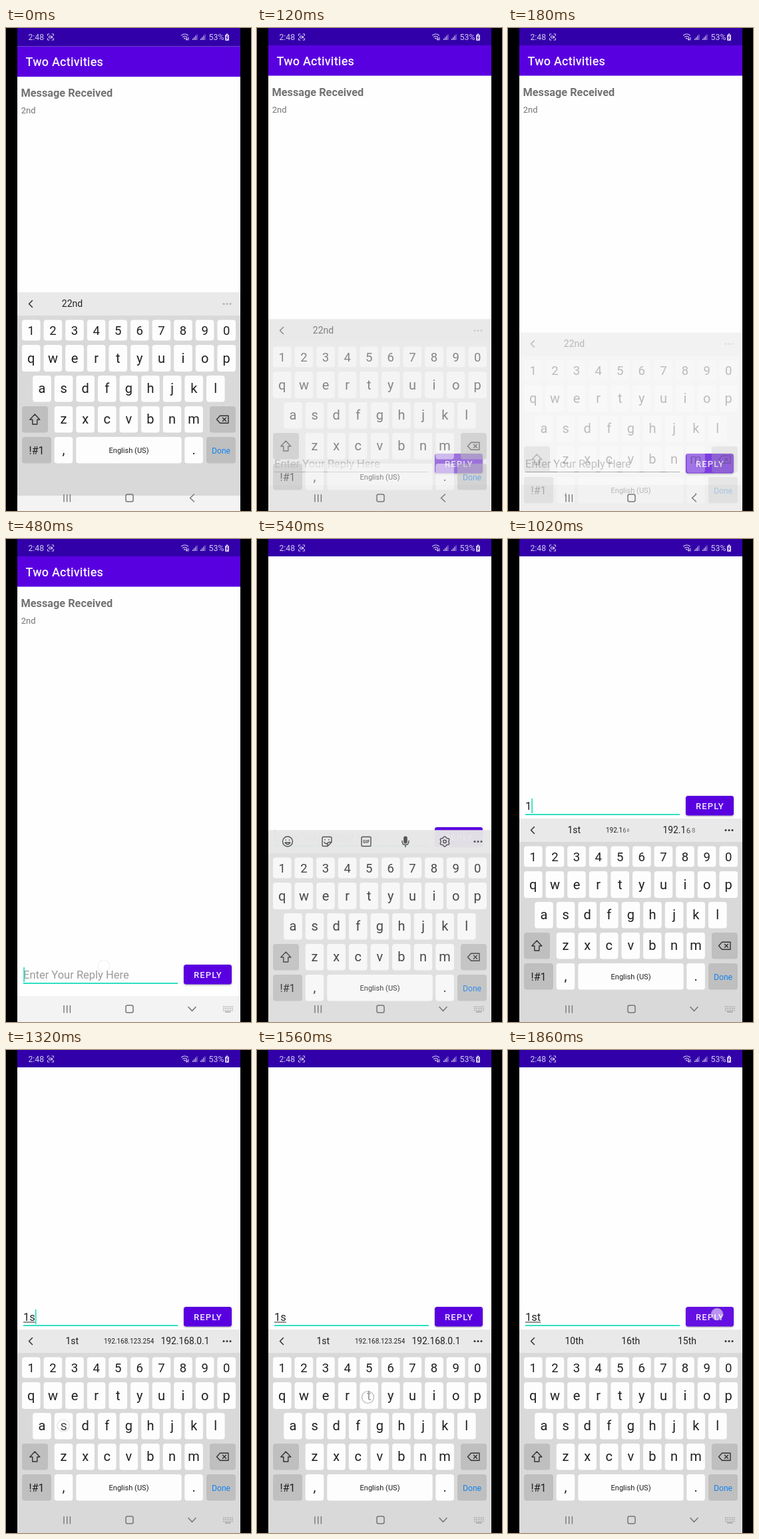
These frames come from a looping animation (368x724 px, 1.92 s). An HTML page with a canvas:

```html
<!DOCTYPE html>
<html lang="en">
<head>
<meta charset="utf-8">
<title>Two Activities</title>
<style>
html, body { margin: 0; width: 100%; height: 100%; overflow: hidden; background: #000; }
canvas { display: block; }
</style>
</head>
<body>
<canvas id="stage" width="368" height="724"></canvas>
<script>
const c = document.getElementById('stage').getContext('2d');
const LOOP = 1920, STEP = 60;
const LEFT = 17, WIDTH = 335;
const PURPLE = '#5900e0', DARK = '#3200a9', TEAL = '#2fe0c2', INK = '#202020';

const clamp = v => Math.max(0, Math.min(1, v));
const during = (t, a, b) => t >= a && t < b;

function box(x, y, w, h, color, r = 0) {
  c.fillStyle = color;
  c.beginPath();
  c.roundRect(x, y, w, h, r);
  c.fill();
}

// y is the middle of the capital letters
function text(s, x, y, size, color, { align = 'left', weight = 400, spacing = 0 } = {}) {
  c.font = `${weight} ${size}px Roboto, sans-serif`;
  c.letterSpacing = spacing + 'px';
  c.textAlign = align;
  c.fillStyle = color;
  c.fillText(s, x, y + size * .355);
}
const label = (s, x, y, size, color = INK) => text(s, x, y, size, color, { align: 'center' });

function stroke(d, x, y, color, width = 1.4) {
  c.save();
  c.translate(x, y);
  c.strokeStyle = color;
  c.lineWidth = width;
  c.lineJoin = c.lineCap = 'round';
  c.stroke(new Path2D(d));
  c.restore();
}

function dot(x, y, r, color) {
  c.fillStyle = color;
  c.beginPath();
  c.arc(x, y, r, 0, 7);
  c.fill();
}

function statusBar(height) {
  const color = '#d3c9f0';
  box(LEFT, 0, WIDTH, height, DARK);
  text('2:48', 33.5, 14, 12.2, color);
  stroke('M-4.5-2V-4.5H-2M2-4.5H4.5V-2M4.5 2V4.5H2M-2 4.5H-4.5V2M-2-1.5H1V1.5H-2ZM1 0L2.5-1.5V1.5Z', 67, 13.5, color, 1);
  stroke('M-5-2Q0-6 5-2M-3 .5Q0-2 3 .5M-1 3L0 2L1 3M3 1V5M2 4L3 5L4 4M5.5 5V1', 268.5, 13, color, 1.1);
  for (const x of [280, 292]) {
    for (let i = 0; i < 4; i++)
      box(x + i * 2.1, 16 - i * 2.2, 1.2, 2 + i * 2.2, i < 3 ? color : '#8d77cf');
  }
  text('53%', 304.5, 14, 12.4, color);
  box(329, 10, 6, 9, color, 1);
  box(330.7, 8.5, 2.6, 2, color);
  stroke('M.7-2.5L-1 .5H1L-.7 3', 332, 14, DARK, 1);
}

function field(t) {
  const typed = t >= 1620 ? '1st' : t >= 1260 ? '1s' : t >= 840 ? '1' : '';
  const focused = t >= 360;
  text(typed || 'Enter Your Reply Here', 26, 653, 16.5, typed ? '#222' : '#9a9a9a');
  const end = 26 + (typed ? c.measureText(typed).width : 0);
  if (typed.length > 1) box(26, 660.5, end - 26, 1, INK);
  if (focused) box(26, 665, 232, 2, TEAL);
  else box(26, 665, 232, 1, '#777');
  if (during(t, 360, 1440) || during(t, 1620, 1740)) box(end + (typed ? 0 : .2), 642, 1.8, 22, TEAL);

  c.save();
  c.shadowColor = 'rgba(0,0,0,.35)';
  c.shadowBlur = 3;
  c.shadowOffsetY = 1;
  box(267, 638, 72, 29.5, t >= 1800 ? '#6410e3' : PURPLE, 3.5);
  c.restore();
  text('REPLY', 282, 653, 13, '#f4eefe', { weight: 500, spacing: 1.16 });
}

function app(t, pan) {
  const drop = 1.5 * clamp(1 - t / 120);
  box(LEFT, 0, WIDTH, 724, '#fefefe');
  c.save();
  c.translate(0, drop - pan);
  box(LEFT, 26, WIDTH, 45.5, PURPLE);
  text('Two Activities', 29.5, 49.5, 18, '#f6f1ff', { weight: 500, spacing: .2 });
  text('Message Received', 22.5, 96, 16.3, '#727272', { weight: 700 });
  text('2nd', 22.7, 122, 13, '#757575');
  c.restore();
  c.save();
  c.translate(0, -pan);
  field(t);
  c.restore();
  statusBar(26 + drop);
}

// letters pop in one after another
function popIn(s, x, y, size, age) {
  let i = 0;
  for (const ch of s) {
    const k = clamp((age - 20 * i++) / 60);
    c.font = `${size}px Roboto, sans-serif`;
    c.letterSpacing = '0px';
    const w = c.measureText(ch).width;
    if (k > 0) {
      c.save();
      c.globalAlpha *= .4 + .6 * k;
      label(ch, x + w / 2, y, size * (.55 + .45 * k));
      c.restore();
    }
    x += w;
  }
}

function toolIcons(y) {
  const ink = '#333';
  stroke('M7.5 0A7.5 7.5 0 1 1-7.5 0A7.5 7.5 0 1 1 7.5 0M-4 1.5Q0 7 4 1.5ZM-2.6-2.5V-2M2.6-2.5V-2', 46, y, ink);
  stroke('M-5-7H5Q7-7 7-5V1L1 7H-5Q-7 7-7 5V-5Q-7-7-5-7M7 1H3Q1 1 1 3V7M-3-3V-2.5M3-3V-2.5M-4 1Q-2 4 0 3', 105, y, ink);
  stroke('M-5.5-7H5.5Q7-7 7-5.5V5.5Q7 7 5.5 7H-5.5Q-7 7-7 5.5V-5.5Q-7-7-5.5-7', 164, y, ink);
  text('GIF', 164, y, 6.5, ink, { align: 'center', weight: 700 });
  box(220.2, y - 8, 5.6, 11, ink, 2.8);
  stroke('M-5-1Q-5 5 0 5Q5 5 5-1M0 5V8', 223, y, ink, 1.5);
  let gear = '';
  for (let i = 0; i < 32; i++) {
    const a = i * Math.PI / 16, r = 6.7 + Math.cos(a * 6) * .9;
    gear += `${i ? 'L' : 'M'}${Math.sin(a) * r} ${Math.cos(a) * r}`;
  }
  stroke(gear + 'ZM2.3 0A2.3 2.3 0 1 1-2.3 0A2.3 2.3 0 1 1 2.3 0', 282, y, ink);
}

function suggestions(t) {
  const y = 436.5;
  box(LEFT, 419.5, WIDTH, 34.5, '#e9e9e9');
  for (const x of [327, 332, 337]) dot(x, y, 1.5, t < 480 ? '#b4b4b4' : '#333');
  if (during(t, 480, 880)) return toolIcons(y);
  stroke('M2.5-5L-2.5 0L2.5 5', 37, y, '#333', 1.5);
  if (t < 480) label('22nd', 99.5, y, 14);
  else if (t < 1680) {
    popIn('1st', 89.5, y, 14, t - 880);
    popIn('192.168.123.254', 147, y, 10, t - 880);
    popIn('192.168.0.1', 232.5, y, 13.8, t - 880);
  } else {
    ['10th', '16th', '15th'].forEach((s, i) => popIn(s, 85.5 + i * 84.7, y, 14, t - 1640));
  }
}

function key(x, y, w, h, s, size = 20, special = false, color = INK) {
  box(x, y, w, h, special ? '#bfbfbf' : '#fdfdfd', 4);
  label(s, x + w / 2, y + h / 2 + (size === 20 ? -.5 : .5), size, color);
}
function keyRow(letters, x, y, h, size) {
  [...letters].forEach((s, i) => key(x + i * 32.6, y, 27.6, h, s, size));
}

function keyboard(t, shift, alpha) {
  c.save();
  c.globalAlpha = alpha;
  c.translate(0, shift);
  box(LEFT, 419.5, WIDTH, 304.5, '#d9d9d9');
  suggestions(t);
  keyRow('1234567890', 24, 460.5, 31, 18.5);
  keyRow('qwertyuiop', 24, 498, 40, 20);
  keyRow('asdfghjkl', 40.2, 544, 39.5, 20);
  key(24, 590, 39, 39.5, '', 20, true);
  stroke('M0-8L7.5 0H3.5V7H-3.5V0H-7.5Z', 43.3, 610, '#333');
  keyRow('zxcvbnm', 72.7, 590, 39.5, 20);
  key(306, 590, 39, 39.5, '', 20, true);
  stroke('M-4-5.5H8.5V5.5H-4L-9 0ZM0-2.5L5 2.5M5-2.5L0 2.5', 325.5, 609.7, '#333');
  key(24, 636, 44, 39.5, '!#1', 16, true);
  key(72.7, 636, 27.6, 39.5, ',', 20);
  key(105.3, 636, 158.4, 39.5, 'English (US)', 11.1);
  key(268.3, 636, 27.6, 39.5, '.', 20);
  key(301, 636, 44, 39.5, 'Done', 12.2, true, '#1683ee');
  c.restore();
}

function navIcons(t) {
  const ink = '#777';
  for (const x of [87, 91.7, 96.4]) box(x - .7, 699, 1.4, 11.5, ink);
  stroke('M-3-5.5H3Q5.5-5.5 5.5-3V3Q5.5 5.5 3 5.5H-3Q-5.5 5.5-5.5 3V-3Q-5.5-5.5-3-5.5', 185.5, 704.5, ink, 1.5);
  if (t < 420) return stroke('M3-5.5L-3 0L3 5.5', 279.5, 704.5, ink, 1.5);
  stroke('M-5.5-3L0 3L5.5-3', 279.5, 704.5, ink, 1.6);
  for (let row = 0; row < 3; row++)
    for (let i = 0; i < 6; i++) box(326 + i * 2.7, 700.5 + row * 2.7, 1.3, 1.3, '#909090');
  box(329, 708.3, 8.5, 1.2, '#909090');
}

const touches = [
  [147, 640, 300, 500], [37, 477, 720, 880], [86, 563, 1200, 1360],
  [166.5, 520.5, 1500, 1690], [314, 396, 1790, 2020]
];
function touch(t) {
  for (const [x, y, from, to] of touches) {
    if (!during(t, from, to)) continue;
    c.save();
    c.globalAlpha = clamp((to - t) / 100);
    dot(x, y, 9, 'rgba(255,255,255,.55)');
    c.strokeStyle = 'rgba(130,130,150,.6)';
    c.lineWidth = 1.2;
    c.stroke();
    c.restore();
  }
}

function draw(t) {
  const rise = 1 - (1 - clamp((t - 480) / 140)) ** 3;
  c.fillStyle = '#000';
  c.fillRect(0, 0, 368, 724);
  c.save();
  c.beginPath();
  c.rect(LEFT, 0, WIDTH, 724);
  c.clip();
  app(t, Math.round(253 * rise));
  box(LEFT, 685, WIDTH, 39, '#f3f3f3');
  if (t < 250) keyboard(t, t / 3 - 23, 1 - t * .004);
  else if (rise > 0) keyboard(t, Math.round(90 * (1 - rise)), rise);
  navIcons(t);
  touch(t);
  c.restore();
}

function frame() {
  const t = performance.now() % LOOP;
  draw(Math.floor(t / STEP) * STEP);
  requestAnimationFrame(frame);
}
frame();
</script>
</body>
</html>
```
